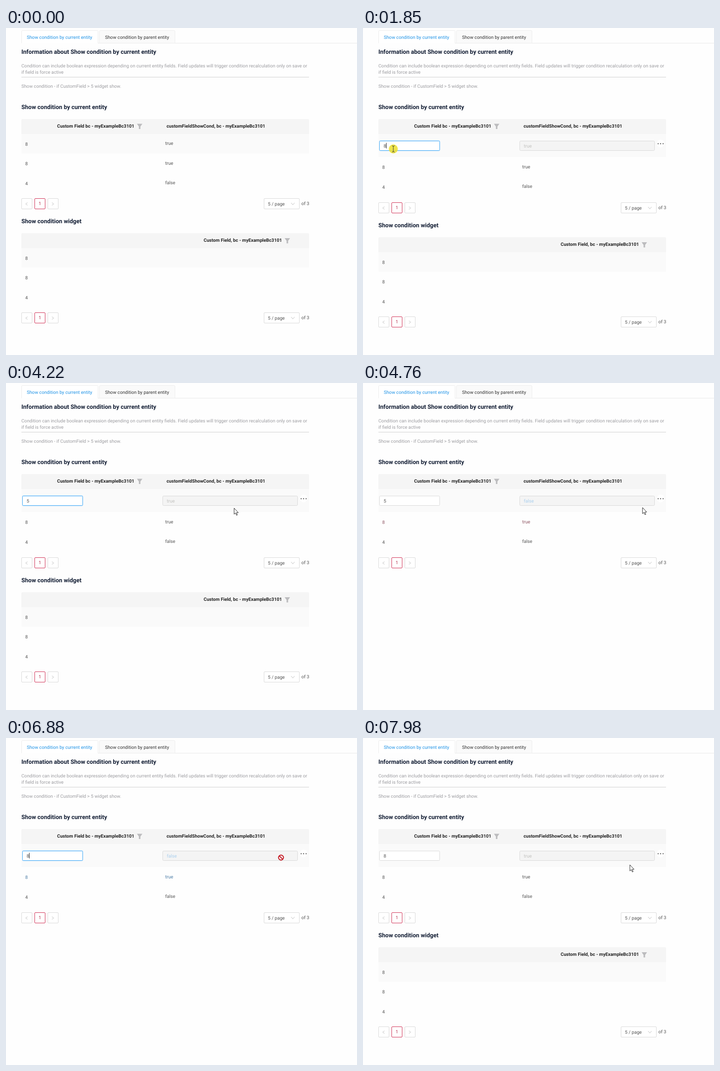
Write an HTML page that moves like this. It is 776x722 px and loops after 8 s.

```html
<!DOCTYPE html>
<html lang="en">
<head>
<meta charset="utf-8">
<title>Show condition</title>
<style>
  html, body { margin: 0; width: 100%; height: 100%; overflow: hidden; background: #fefefe; }
  svg { display: block; }
  text { font: 10.16px Roboto, sans-serif; fill: #555; text-rendering: geometricPrecision; white-space: pre; }
  .title { font-size: 13.06px; font-weight: 700; fill: #141f35; }
  .head { font-weight: 700; fill: #222; }
  .note { fill: #9c9ca0; }
  .box { fill: #fff; stroke: #d9d9d9; }
  .line { fill: none; stroke: #bfbfbf; }
</style>
</head>
<body>
<svg id="stage" width="776" height="722" viewBox="0 0 776 722"></svg>
<script>
const LOOP = 8000;
const stage = document.getElementById('stage');

// y is the vertical middle of the capitals
const text = (x, y, s, cls = '', attrs = '') =>
  `<text x="${x}" y="${y + (cls === 'title' ? 4.6 : 3.6)}" class="${cls}" ${attrs}>${s}</text>`;
const rect = (x, y, w, h, attrs) => `<rect x="${x}" y="${y}" width="${w}" height="${h}" ${attrs}/>`;
const path = (d, attrs) => `<path d="${d}" ${attrs}/>`;
const group = (id, body) => `<g id="${id}">${body}</g>`;
const funnel = (x, y) =>
  path(`M${x} ${y}h12l-4.3 6v5.6h-3.4v-5.6z`, 'fill="#bcbcbe"');

const tabs =
  path('M203.5 33.5H776', 'class="line" style="stroke:#e8e8e8"') +
  path('M34.5 33.5V7.500q0-2 2-2H201.500q2 0 2 2V33.500', 'fill="#fff" stroke="#ececec"') +
  path('M206.5 33.5V7.500q0-2 2-2H371.500q2 0 2 2V33.500z', 'fill="#fafafa" stroke="#ececec"') +
  text(46, 20, 'Show condition by current entity', '', 'style="fill:#1f93e6"') +
  text(219, 20, 'Show condition by parent entity', '', 'style="fill:#333"');

const info =
  text(34, 52.5, 'Information about Show condition by current entity', 'title') +
  text(34, 83, 'Condition can include boolean expression depending on current entity fields. Field updates will trigger condition recalculation only on save or', 'note') +
  text(34, 97.5, 'if field is force active', 'note') +
  path('M34 108.5H670', 'class="line" style="stroke:#cfcfcf"') +
  text(34, 128, 'Show condition - if CustomField &gt; 5 widget show.', 'note');

const tableTop = title =>
  text(34, 174.5, title, 'title') +
  path('M34 234V204q0-3 3-3H667q3 0 3 3V234z', 'fill="#f5f5f5"');

const pager =
  [34.5, 63.5, 92.5].map((x, i) =>
    rect(x, 376.5, 23, 23, `rx="1.5" class="box" ${i === 1 ? 'style="stroke:#cf2a50"' : ''}`)).join('') +
  path('M47.500 385.500l-4 3 4 3M101.500 385.500l4 3-4 3', 'class="line"') +
  text(72, 387.5, '1', '', 'style="fill:#b52a48"') +
  rect(570.5, 376.5, 78, 23, 'rx="1.5" class="box"') +
  text(579, 388.5, '5 / page') +
  path('M630.500 386l3.700 4.500 3.700-4.500', 'class="line"') +
  text(653, 387.5, 'of 3');

const editor =
  rect(35.5, 248, 135, 24, 'id="glow" rx="3" fill="#cfe8fd"') +
  rect(36.5, 249.5, 133, 21, 'id="input" rx="2" class="box"') +
  rect(45, 253.5, 6, 12.500, 'id="selection" fill="#1c7fe0"') +
  text(45.5, 260, '8', '', 'id="value"') +
  path('M51.5 253.500v12.500', 'id="caret" stroke="#222"') +
  rect(346.5, 249.5, 298, 21, 'rx="2" style="fill:#f4f4f4;stroke:#d9d9d9"') +
  text(355.5, 260, 'true', '', 'id="result"') +
  group('dots', '<circle cx="658" cy="255" r="8.500" fill="#fff"/>' +
    [652.5, 658, 663.5].map(x => `<circle cx="${x}" cy="255.500" r="1.1" fill="#222"/>`).join(''));

const pointer =
  '<circle id="press" r="10" fill="#ece02e" opacity=".85"/>' +
  path('M0 0V13.500L3.100 10.700 5.300 15.800 7.300 15 5.100 10H9.300z',
    'id="arrow" fill="#fff" stroke="#222" stroke-linejoin="round"') +
  path('M-3-7Q0-7 0-5Q0-7 3-7M0-5V5M-3 7Q0 7 0 5Q0 7 3 7', 'id="beam" fill="none" stroke="#333"') +
  path('M-5.500 0a5.500 5.500 0 1 0 11 0a5.500 5.500 0 1 0-11 0M-3.900-3.900L3.900 3.900',
    'id="barred" fill="none" stroke="#c4101c" stroke-width="2"');

stage.innerHTML = tabs + info + tableTop('Show condition by current entity') +
  text(113, 216, 'Custom Field bc - myExampleBc3101', 'head') + funnel(289.5, 211.5) +
  text(355, 216, 'customFieldShowCond, bc - myExampleBc3101', 'head') +
  rect(34, 234, 636, 43, 'id="firstRow" fill="#fafafa"') +
  group('plain', text(42.5, 256, '8') + text(352, 254, 'true')) +
  group('editor', editor) +
  group('rows',
    group('second', text(42.5, 299.500, '8') + text(352, 298, 'true')) +
    text(42.5, 343, '4') + text(352, 341.500, 'false')) +
  group('pager', pager) +
  group('widget', '<g transform="translate(0 252)">' + tableTop('Show condition widget') +
    text(437, 216, 'Custom Field, bc - myExampleBc3101', 'head') + funnel(616, 212) +
    rect(34, 234, 636, 43, 'fill="#fafafa"') +
    ['8', '8', '4'].map((s, i) => text(42.5, 256 + 43.5 * i, s)).join('') + pager + '</g>') +
  group('pointer', pointer);

const el = {};
stage.querySelectorAll('[id]').forEach(node => el[node.id] = node);

// pointer stops: time, x, y
const stops = [
  [60, 708, 674], [790, 364, 266], [1530, 364, 266], [1670, 215, 290], [1830, 67, 267],
  [1900, 67, 267], [2030, 64.5, 264], [3150, 64.5, 264], [3300, 79, 281], [3700, 79, 281],
  [4440, 618, 275], [4850, 618, 275], [5310, 110, 285], [5440, 60, 266], [5520, 60, 266],
  [5700, -8, 269], [5850, -8, 269], [6140, 60, 278], [6200, 60, 278], [6870, 608, 264],
  [7000, 608, 264], [7350, 630, 299], [7520, 630, 299], [7800, 590, 280]
];
const within = (t, ...spans) => spans.some(([a, b]) => t >= a && t < b);
const show = (node, on) => node.style.display = on ? '' : 'none';
const shift = (node, y) => node.setAttribute('transform', `translate(0 ${y})`);

function pointerAt(t) {
  const next = stops.findIndex(s => s[0] > t);
  if (next <= 0) return stops[next < 0 ? stops.length - 1 : 0].slice(1);
  const [t0, x0, y0] = stops[next - 1], [t1, x1, y1] = stops[next];
  const p = (t - t0) / (t1 - t0), e = p * p * (3 - 2 * p);
  return [x0 + (x1 - x0) * e, y0 + (y1 - y0) * e];
}

function draw(t) {
  const editing = t >= 1000;
  const focused = within(t, [1800, 4440], [5440, 7450]);
  const selected = within(t, [5560, 6250]);
  const failed = within(t, [4520, 7830]);

  show(el.plain, !editing);
  show(el.editor, editing);
  el.firstRow.setAttribute('height', editing ? 51 : 43);
  shift(el.rows, editing ? 8 : 0);
  shift(el.pager, editing ? 9 : 0);
  shift(el.widget, editing ? 9 : 0);
  show(el.widget, !failed);

  show(el.glow, focused);
  el.input.style.stroke = focused ? '#40a9f5' : '';
  show(el.selection, selected);
  show(el.caret, within(t, [1800, 3300], [5440, 5560], [6250, 7450]));
  el.value.textContent = within(t, [3150, 6250]) ? '5' : '8';
  el.value.style.fill = selected ? '#fff' : '';
  el.result.textContent = failed ? 'false' : 'true';
  el.result.style.fill = failed ? '#a9cfee' : '#c2c2bf';
  const tint = !failed ? '' : t < 5340 ? '#8f5563' : '#4b7ca6';
  for (const cell of el.second.children) cell.style.fill = tint;
  show(el.dots, !within(t, [5680, 6020]));

  const [x, y] = pointerAt(t);
  const inField = editing && y > 248 && y < 272;
  const overInput = inField && x > 36 && x < 170 || within(t, [5440, 5900]);
  const overResult = inField && x > 346 && x < 645;
  show(el.pointer, within(t, [60, 2430], [3200, LOOP]));
  el.pointer.setAttribute('transform', `translate(${x} ${y})`);
  show(el.press, within(t, [970, 1130], [1790, 1960], [4400, 4510], [5440, 5900], [7380, 7500]));
  show(el.beam, overInput);
  show(el.barred, overResult);
  show(el.arrow, !overInput && !overResult);
}

function tick() {
  draw(performance.now() % LOOP);
  requestAnimationFrame(tick);
}
tick();
</script>
</body>
</html>
```
